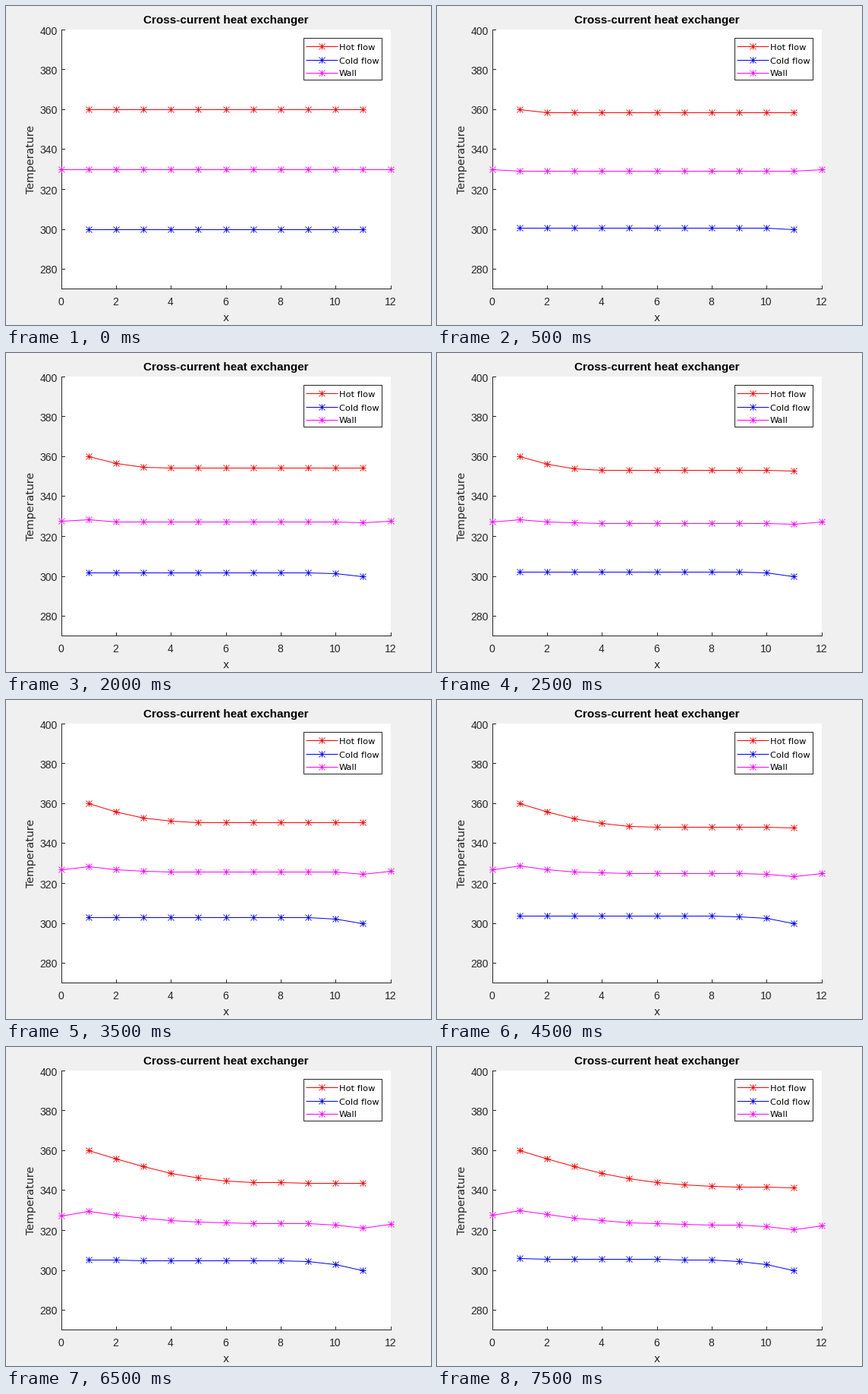
Animation, 560 px wide and 420 px high, one loop 8000 ms. Source, as a matplotlib script:

```python
import numpy as np
import matplotlib.pyplot as plt
from matplotlib.animation import FuncAnimation
from matplotlib.patches import Rectangle

W, H, DPI = 560, 420, 100
PT = 72 / DPI                      # one pixel in points
INK = "#262626"
FRAMES, INTERVAL = 16, 500

plt.rcParams["path.snap"] = False  # lines are placed on pixel centres by hand
fig = plt.figure(figsize=(W / DPI, H / DPI), dpi=DPI, facecolor="#f0f0f0")
ax = fig.add_axes([0, 0, 1, 1])
ax.set_xlim(0, W)
ax.set_ylim(H, 0)
ax.axis("off")


def px(x):
    return np.floor(73.22 + 36.15 * np.asarray(x, float))


def py(temp):
    return np.floor(31.3 + 2.628 * (400 - np.asarray(temp, float)))


def simulate():
    """One explicit step of the counter-flow exchanger per frame."""
    hot, cold, wall = np.full(11, 360.0), np.full(11, 300.0), np.full(13, 330.0)
    states = []
    for _ in range(FRAMES):
        states.append((hot, cold, wall))
        mid = wall[1:-1]
        to_wall, from_wall = hot - mid, mid - cold
        new_hot, new_cold, new_wall = hot.copy(), cold.copy(), wall.copy()
        new_hot[1:] += 0.325 * (hot[:-1] - hot[1:]) - 0.0492 * to_wall[1:]
        new_cold[:-1] += 0.086 * (cold[1:] - cold[:-1]) + 0.0154 * from_wall[:-1]
        new_wall[1:-1] += 0.150 * to_wall - 0.180 * from_wall
        new_wall[0], new_wall[-1] = wall[2], wall[-3]
        hot, cold, wall = new_hot, new_cold, new_wall
    return states


class Series:
    """A thin line with eight-armed star markers, in whole pixels."""

    def __init__(self, color):
        style = dict(color=color, clip_on=False, zorder=3)
        self.line, = ax.plot([], [], lw=PT, **style)
        self.stars = [
            ax.plot([], [], ls="none", marker=m, ms=8 * PT, mew=width * PT, **style)[0]
            for m, width in (("+", 1), ("x", 0.8))
        ]

    def set(self, x, y):
        self.line.set_data(x + 0.5, y + 0.5)
        for s in self.stars:
            s.set_data(x + 0.2, y + 0.2)

    @property
    def artists(self):
        return [self.line, *self.stars]


def rule(x, y):
    ax.plot(x, y, color=INK, lw=PT, solid_capstyle="butt", zorder=2)


def label(x, y, s, size, font="DejaVu Sans", color=INK, **kw):
    kw = {"ha": "center", "va": "baseline", **kw}
    ax.text(x, y, s, fontsize=size * PT, family=font, color=color, zorder=4, **kw)


# Axes
ax.add_patch(Rectangle((73, 31), 434, 342, fc="white", ec="none"))
rule([73.5, 73.5], [31, 373])
rule([73, 508], [372.5, 372.5])
for t in range(280, 401, 20):
    y = py(t) + 0.5
    rule([73, 78], [y, y])
    label(68, y + 6, str(t), 14, "Liberation Sans", ha="right")
for v in range(0, 13, 2):
    x = px(v) + 0.5
    rule([x, x], [368, 373])
    label(x - 1, 393.5, str(v), 14, "Liberation Sans")

label(290, 23, "Cross-current heat exchanger", 15.3, "Liberation Sans",
      "black", weight="bold")
label(290, 415, "x", 13.9)
label(36.5, 201.5, "Temperature", 14.1, rotation=90, rotation_mode="anchor")

# Legend
ax.add_patch(Rectangle((392.5, 42.5), 103, 55, fc="white", ec=INK, lw=PT, zorder=2))
COLORS = ("#ff0000", "#0000ff", "#ff00ff")
for name, color, y in zip(("Hot flow", "Cold flow", "Wall"), COLORS, (53, 71, 88)):
    key = Series(color)
    key.line.set_data([396, 437], [y + 0.5, y + 0.5])
    for s in key.stars:
        s.set_data([416.2], [y + 0.2])
    label(439, y + 4.5, name, 11.4, color="black", ha="left")

# Data
STATES = simulate()
XS = (px(np.arange(1, 12)), px(np.arange(1, 12)), px(np.arange(13)))
curves = [Series(c) for c in COLORS]


def draw(i):
    for curve, x, temp in zip(curves, XS, STATES[i]):
        curve.set(x, py(temp))
    return [a for c in curves for a in c.artists]


anim = FuncAnimation(fig, draw, frames=FRAMES, interval=INTERVAL,
                     repeat=True, repeat_delay=0, blit=False)
plt.show()
```
